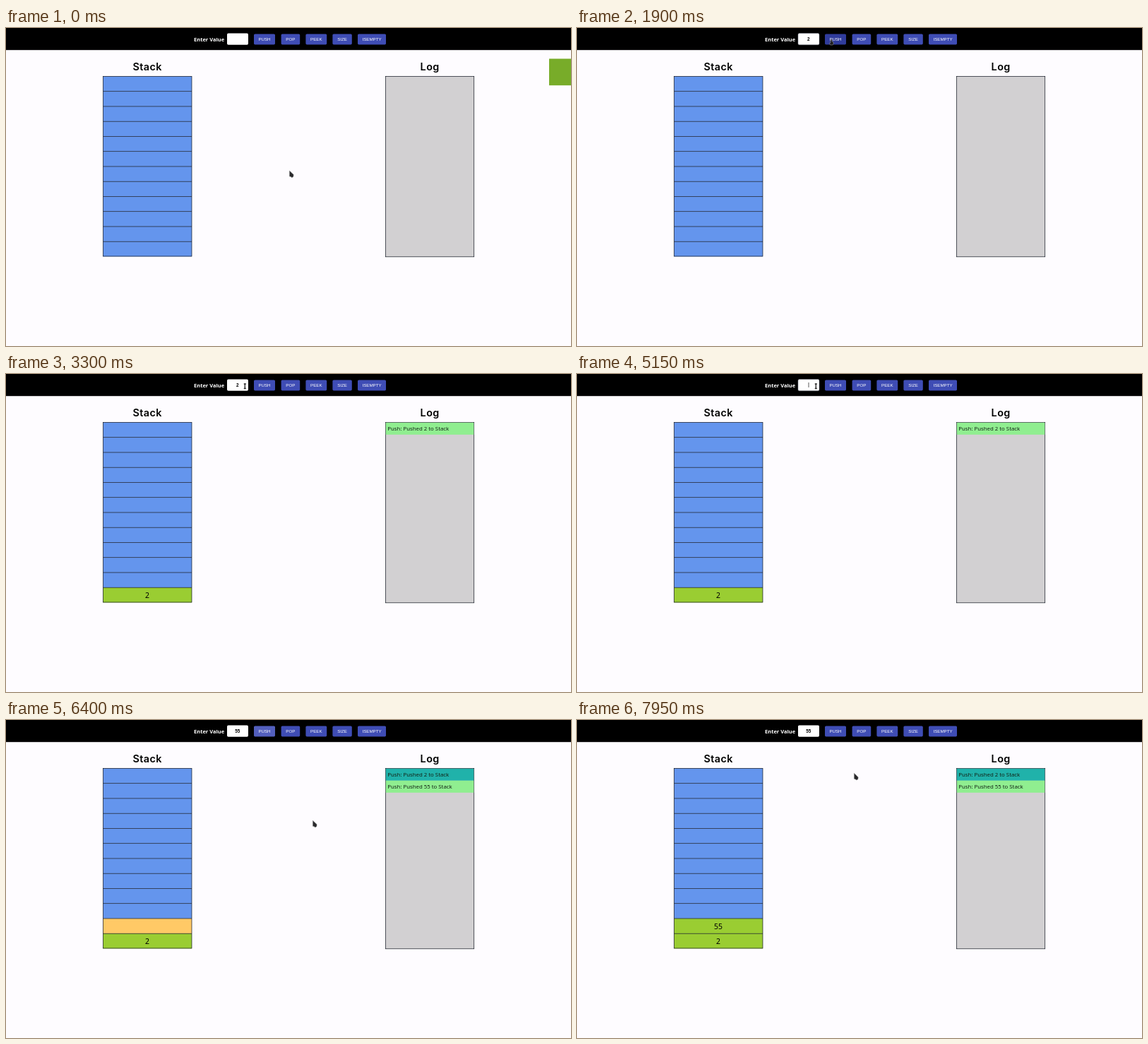
An HTML page for the animation above (8 s loop, 800 px wide and 450 px high).

```html
<!DOCTYPE html>
<html lang="en">
<head>
<meta charset="utf-8">
<title>Stack visualizer</title>
<style>
  html, body { margin: 0; width: 100%; height: 100%; overflow: hidden; background: #fefcff; }
  svg { display: block; width: 100vw; height: 100vh; }
  .heading { font: 600 14.4px Inter, sans-serif; letter-spacing: .45px; text-anchor: middle; }
  .label { font: 700 7.5px "Noto Sans", sans-serif; fill: #fff; }
  .button { font: 6.2px "Liberation Sans", sans-serif; fill: #fff; text-anchor: middle; }
  .entry { font: 7.8px "Noto Sans", sans-serif; fill: #132216; }
  .value { font: 10.5px "Noto Sans", sans-serif; text-anchor: middle; }
  .input { font: 700 6.4px "Liberation Sans", sans-serif; text-anchor: middle; }
</style>
</head>
<body>
<svg id="stage" viewBox="0 0 800 450"></svg>
<script>
const LOOP = 8000, STEP = 50, SLOTS = 12, SLOT_HEIGHT = 21.25;
const stage = document.getElementById('stage');

function set(node, attrs) {
  for (const key in attrs) node.setAttribute(key, attrs[key]);
  return node;
}
function add(tag, attrs, parent = stage) {
  return parent.appendChild(set(document.createElementNS('http://www.w3.org/2000/svg', tag), attrs));
}
function rect(x, y, width, height, fill, extra = {}) {
  return add('rect', { x, y, width, height, fill, ...extra });
}
function text(className, x, y, content) {
  const node = add('text', { class: className, x, y });
  node.textContent = content;
  return node;
}
function show(node, visible) {
  node.style.display = visible ? '' : 'none';
}

// Toolbar
rect(0, 0, 800, 31.2, '#000');
text('label', 266, 19, 'Enter Value');
const input = rect(313, 7.6, 30, 16.2, '#fff', { rx: 1.8 });
const inputText = text('input', 327.7, 18.1, '');
const caret = rect(327.6, 12, 0.8, 7, '#333');

const buttons = [['PUSH', 351, 30], ['POP', 389.6, 26.6], ['PEEK', 424.4, 29.8],
  ['SIZE', 462.4, 27.4], ['ISEMPTY', 498, 40]];
const buttonRects = buttons.map(([, x, width]) => rect(x, 8.4, width, 15, '#3f4db5', { rx: 1.6 }));
const pushButton = buttonRects[0];
const clip = add('clipPath', { id: 'pushClip' });
add('rect', { x: 351, y: 8.4, width: 30, height: 15, rx: 1.6 }, clip);
const ripple = add('circle', { fill: '#fff', 'clip-path': 'url(#pushClip)' });
buttons.forEach(([name, x, width]) => text('button', x + width / 2, 18.1, name));

// Stack and log
text('heading', 200.2, 60.2, 'Stack');
text('heading', 600.2, 60.2, 'Log');
const slots = Array.from({ length: SLOTS }, (_, i) =>
  rect(137.5, 68.4 + i * SLOT_HEIGHT, 125.5, SLOT_HEIGHT, '#6495ed'));
for (let i = 1; i < SLOTS; i++) rect(137.5, 68.1 + i * SLOT_HEIGHT, 125.5, 0.7, '#101420');
const outline = { stroke: '#101420', 'stroke-width': 0.7 };
rect(137.5, 68.4, 125.5, SLOTS * SLOT_HEIGHT - 0.4, 'none', outline);
rect(537.4, 68.4, 125.3, 255.4, '#d2d0d2', outline);

const pushes = [{ value: '2', click: 1950 }, { value: '55', click: 6000 }];
const SETTLE = 1000;
pushes.forEach((push, i) => {
  push.slot = slots[SLOTS - 1 - i];
  push.number = text('value', 200, 317.2 - i * SLOT_HEIGHT, push.value);
  push.row = rect(537.8, 68.8 + i * 17, 124.5, 17, '#90ee90');
  push.entry = text('entry', 540.3, 80.2 + i * 17.1, `Push: Pushed ${push.value} to Stack`);
});

const toast = rect(769, 43.5, 60, 37.7, '#78ac29');

// Pointer shapes
const pointers = {
  arrow: add('path', {
    d: 'M.4 0V8L2.6 8.6L3.6 9.8L5.8 8.6L6.2 5.6Z',
    fill: '#29292b', stroke: '#8c8c8e', 'stroke-width': 0.5
  }),
  hand: add('path', {
    d: 'M-1 -2.5Q0 -4 1 -2.5V-.8L3 .2V3.2L2 4.4H-1.4L-2.6 2L-1 1.2Z',
    fill: '#1c1c20', stroke: '#909090', 'stroke-width': 0.6
  }),
  beam: add('path', {
    d: 'M-1.5 -3H1.5M0 -3V3.5M-1.5 3.5H1.5',
    fill: 'none', stroke: '#222', 'stroke-width': 1.3
  })
};

const route = [[0, 401, 202], [250, 401, 202], [550, 344, 59], [700, 338, 27], [850, 334, 16],
  [1300, 334, 16], [1650, 360, 19.6], [2700, 360, 19.6], [2900, 338.3, 17], [5500, 338.3, 17],
  [5700, 365, 27], [5800, 365, 27], [5900, 364, 19], [6100, 364, 19], [6400, 434, 142.2],
  [6650, 432, 150], [6850, 410, 166], [6950, 410, 166], [7150, 407, 164], [7400, 407, 164],
  [7950, 392, 75.3]];

function pointerAt(time) {
  const next = route.findIndex(point => point[0] > time);
  if (next < 0) return route[route.length - 1].slice(1);
  const [t0, x0, y0] = route[next - 1], [t1, x1, y1] = route[next];
  const p = (time - t0) / (t1 - t0);
  return [x0 + (x1 - x0) * p, y0 + (y1 - y0) * p];
}

const typing = [[0, ''], [1200, '2'], [4650, ''], [5300, '5'], [5500, '55']];

function render(time) {
  const [x, y] = pointerAt(time);
  const inBar = y > 8 && y < 24;
  const overPush = inBar && x > 351 && x < 381;
  const kind = overPush ? 'hand' : inBar && x > 313 && x < 343 ? 'beam' : 'arrow';
  for (const name in pointers) {
    show(pointers[name], name === kind);
    set(pointers[name], { transform: `translate(${x} ${y})` });
  }

  inputText.textContent = typing.filter(([start]) => time >= start).pop()[1];
  show(caret, time >= 5150 && time < 5300);
  const focused = time >= 1000 && time < 1950 || time >= 4100 && time < 6000;
  set(input, { stroke: focused ? '#777b88' : 'none', 'stroke-width': 0.5 });
  set(pushButton, { fill: overPush ? '#303c9c' : '#3f4db5' });

  const active = pushes.find(({ click }) => time >= click && time < click + 600);
  show(ripple, active);
  if (active) {
    const p = (time - active.click) / 600;
    set(ripple, { cx: 360, cy: 18, r: 3 + 23 * Math.min(1, p * 1.6), opacity: 0.3 * (1 - p) });
  }

  pushes.forEach(({ click, slot, number, row, entry }, i) => {
    const pushed = time >= click, settled = time >= click + SETTLE;
    const later = pushes[i + 1];
    set(slot, { fill: settled ? '#9acd32' : pushed ? '#ffc966' : '#6495ed' });
    set(row, { fill: later && time >= later.click ? '#20b2aa' : '#90ee90' });
    show(number, settled);
    show(row, pushed);
    show(entry, pushed);
  });

  show(toast, time < 100);
  set(toast, { x: 769 + time * 0.36 });
}

function frame() {
  const time = performance.now() % LOOP;
  render(Math.floor(time / STEP) * STEP);
  requestAnimationFrame(frame);
}
frame();
</script>
</body>
</html>
```
